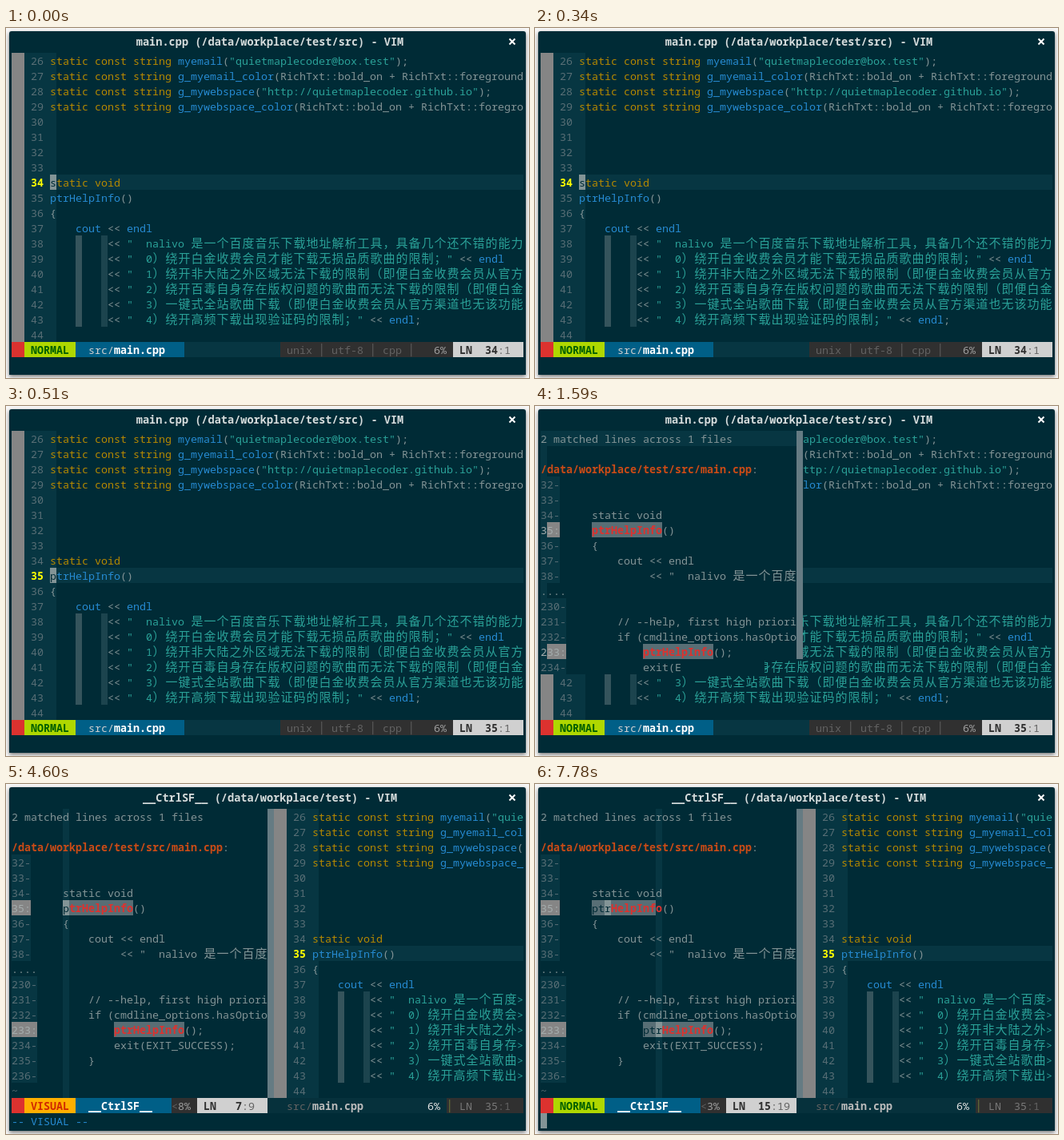
An HTML page with a canvas for the animation above (8 s loop, 654 by 437 pixels).

```html
<!DOCTYPE html>
<html lang="zh">
<head>
<meta charset="utf-8">
<title>Vim search and multiple cursors</title>
<style>
  html, body { margin: 0; width: 100%; height: 100%; overflow: hidden; background: #f8f8f8; }
  canvas { display: block; width: 654px; height: 437px; }
</style>
</head>
<body>
<canvas id="stage" width="654" height="437"></canvas>
<script>
const ctx = document.getElementById('stage').getContext('2d');
const CELL = 8, ROW = 19, LEFT = 7, TOP = 31, RIGHT = 647, SPLIT = 327;
const STATUS = 19, COMMAND = 20, LOOP = 8000;
const MONO = '"Noto Sans Mono", "DejaVu Sans Mono", monospace';
const CJK = '15px "Noto Sans CJK SC", "Noto Sans CJK", sans-serif';
const C = {
  page: '#f8f8f8', bg: '#002b36', band: '#073642', dim: '#586e75', text: '#839496',
  yellow: '#b58900', blue: '#268bd2', cyan: '#2aa198', red: '#dc322f', orange: '#cb4b16',
  sign: '#858585', split: '#657b83', guide1: '#35545c', guide2: '#1c444e',
  info: '#303030', faint: '#626262', light: '#d0d0d0', white: '#ffffff'
};

const source = [
  'static const string myemail("quietmaplecoder@box.test");',
  'static const string g_myemail_color(RichTxt::bold_on + RichTxt::foreground',
  'static const string g_mywebspace("http://quietmaplecoder.github.io");',
  'static const string g_mywebspace_color(RichTxt::bold_on + RichTxt::foregro',
  '', '', '', '',
  'static void',
  'ptrHelpInfo()',
  '{',
  '    cout << endl',
  '         << "  nalivo 是一个百度音乐下载地址解析工具，具备几个还不错的能力',
  '         << "  0）绕开白金收费会员才能下载无损品质歌曲的限制；" << endl',
  '         << "  1）绕开非大陆之外区域无法下载的限制（即便白金收费会员从官方',
  '         << "  2）绕开百毒自身存在版权问题的歌曲而无法下载的限制（即便白金',
  '         << "  3）一键式全站歌曲下载（即便白金收费会员从官方渠道也无该功能',
  '         << "  4）绕开高频下载出现验证码的限制；" << endl;',
  ''
];
const results = [
  '2 matched lines across 1 files',
  '',
  '/data/workplace/test/src/main.cpp:',
  '32-',
  '33-',
  '34-     static void',
  '35:     ptrHelpInfo()',
  '36-     {',
  '37-         cout << endl',
  '38-              << "  nalivo 是一个百度',
  '....',
  '230-',
  '231-        // --help, first high priori',
  '232-        if (cmdline_options.hasOptio',
  '233:            ptrHelpInfo();',
  '234-            exit(EXIT_SUCCESS);',
  '235-        }',
  '236-',
  '~'
];
const MATCH = 'ptrHelpInfo';
const TOKENS = /("[^"]*"?|\b(?:static|const|string|void)\b|\b(?:cout|endl|ptrHelpInfo|myemail|g_\w+)\b)/;

const rowY = row => TOP + row * ROW;
const isWide = ch => ch >= '\u2e80';

function fill(color, x, y, w, h) {
  ctx.fillStyle = color;
  ctx.fillRect(x, y, w, h);
}
const block = (color, x, row, w, rows = 1) => fill(color, x, rowY(row), w, rows * ROW);

// Writes on the terminal grid and returns the x after the last cell.
function put(x, row, str, color, bold = false, max = RIGHT) {
  const font = `${bold ? 'bold ' : ''}13.333px ${MONO}`;
  const y = rowY(row) + 15;
  ctx.fillStyle = color;
  for (let ch of str) {
    if (x >= max) break;
    const wide = isWide(ch);
    if (wide && x + 2 * CELL > max) {
      ch = '>';
      ctx.font = font;
      ctx.fillText(ch, x, y);
      return max;
    }
    ctx.font = wide ? CJK : font;
    if (ch !== ' ') ctx.fillText(ch, wide ? x + 0.5 : x, y);
    x += wide ? 2 * CELL : CELL;
  }
  return x;
}

function tokenColor(token) {
  if (token[0] === '"') return C.cyan;
  if (/^(static|const|string|void)$/.test(token)) return C.yellow;
  return TOKENS.test(token) ? C.blue : C.text;
}

function cursor(x, row, ch = ' ') {
  block(C.text, x, row, CELL);
  put(x, row, ch, C.bg);
}

function drawWindow(title) {
  ctx.save();
  ctx.shadowColor = 'rgba(0,0,0,.55)';
  ctx.shadowBlur = 5;
  ctx.shadowOffsetY = 2;
  ctx.fillStyle = C.bg;
  ctx.beginPath();
  ctx.roundRect(4, 4, 646, 429, [3, 3, 0, 0]);
  ctx.fill();
  ctx.restore();

  ctx.font = `bold 13.6px ${MONO}`;
  ctx.fillStyle = '#d6dcdc';
  ctx.textAlign = 'center';
  ctx.fillText(`${title} - VIM`, 330, 22);
  ctx.textAlign = 'left';

  ctx.strokeStyle = C.white;
  ctx.lineWidth = 2;
  ctx.beginPath();
  ctx.moveTo(629.5, 13.5); ctx.lineTo(636.5, 20.5);
  ctx.moveTo(636.5, 13.5); ctx.lineTo(629.5, 20.5);
  ctx.stroke();
}

function drawSource(x, line) {
  const code = x + 48, current = line - 26;
  block(C.sign, x, 0, 16, 19);
  block(C.band, x + 16, 0, 40 , 19);
  block(C.band, code, current, RIGHT - code);
  block(C.guide1, code + 32, 12, CELL, 6);
  block(C.guide2, code + 64, 12, CELL, 6);
  source.forEach((str, row) => {
    const here = row === current;
    put(x + 24, row, String(26 + row), here ? '#ffff00' : C.dim, here);
    let at = code;
    for (const token of str.split(TOKENS)) at = put(at, row, token, tokenColor(token));
  });
}

function drawResults({ row, col, mode, selected = [], hideCursor }) {
  const column = LEFT + (col - 1) * CELL;
  const matchAt = str => str.indexOf(MATCH);
  const numberOf = str => (str.match(/^\d+[-:]/) || [''])[0];

  if (mode === 'NORMAL' && !selected.length) block(C.band, LEFT, row - 1, SPLIT - LEFT);
  results.forEach((str, i) => {
    const number = numberOf(str), m = matchAt(str);
    block(m < 0 ? C.band : C.sign, LEFT, i, number.length * CELL);
    if (m >= 0) block(C.dim, LEFT + m * CELL, i, MATCH.length * CELL);
  });
  block(C.band, column, 0, CELL, 19);

  results.forEach((str, i) => {
    const number = numberOf(str), m = matchAt(str);
    let x = put(LEFT, i, number, m < 0 ? C.dim : '#a4acac');
    let rest = str.slice(number.length);
    if (i === 2) {
      x = put(x, i, rest.slice(0, -1), C.orange, true);
      rest = ':';
    }
    if (m < 0) {
      put(x, i, rest, str === '~' ? C.dim : C.text, false, SPLIT);
    } else {
      x = put(LEFT + m * CELL, i, MATCH, C.red, true);
      put(x, i, str.slice(m + MATCH.length), C.text);
    }
  });

  for (const [line, length] of selected) {
    const x = LEFT + matchAt(results[line - 1]) * CELL;
    block(C.dim, x, line - 1, length * CELL);
    put(x, line - 1, MATCH.slice(0, length), C.bg);
    cursor(x + (length - 1) * CELL, line - 1, MATCH[length - 1]);
  }
  if (!selected.length && !hideCursor) cursor(column, row - 1, results[row - 1][col - 1]);
}

function drawMode(mode) {
  const visual = mode === 'VISUAL';
  block(C.red, LEFT, STATUS, 16);
  block(visual ? '#ffaf00' : '#afd700', 23, STATUS, 64);
  put(31, STATUS, mode, visual ? '#d02800' : '#005f00', true);
}

function drawPosition(x, row, col, bg, strong, soft, bold) {
  block(bg, x, STATUS, 88);
  put(x + 8, STATUS, 'LN', strong, bold);
  put(x + 56 - String(row).length * CELL, STATUS, String(row), strong, bold);
  put(x + 56, STATUS, ':' + col, soft);
}

function drawEditor({ line, command }) {
  drawWindow('main.cpp (/data/workplace/test/src)');
  drawSource(LEFT, line);
  block(C.band, 223, STATUS, 120);
  drawMode('NORMAL');
  block('#005f87', 87, STATUS, 136);
  put(put(103, STATUS, 'src/', C.light), STATUS, 'main.cpp', C.white, true);
  block(C.info, 343, STATUS, 216);
  put(351, STATUS, 'unix │ utf-8 │ cpp │', C.faint);
  put(535, STATUS, '6%', '#9e9e9e');
  drawPosition(559, line, 1, C.light, C.info, C.faint, true);
  if (command) cursor(LEFT, COMMAND);
  else cursor(55, line - 26, source[line - 26][0]);
}

// The result pane is painted over the editor down to the middle of one row.
function drawOpening() {
  drawEditor({ line: 35, command: true });
  block(C.bg, LEFT, COMMAND, CELL);
  block(C.bg, LEFT, 0, 328, 15);
  block(C.bg, LEFT, 15, 280);
  ctx.save();
  ctx.beginPath();
  ctx.rect(LEFT, TOP, 328, 15 * ROW);
  ctx.rect(LEFT, rowY(15), 176, ROW);
  ctx.clip();
  drawResults({ row: 1, col: 1, mode: 'NORMAL', hideCursor: true });
  block(C.split, SPLIT, 0, CELL, 15);
  ctx.restore();
}

function drawSplit(state) {
  const { row, col, mode, command } = state;
  drawWindow('__CtrlSF__ (/data/workplace/test)');
  drawResults({ ...state, hideCursor: command });
  block(C.split, SPLIT, 0, CELL, 19);
  drawSource(335, 35);

  drawMode(mode);
  block('#005f87', 87, STATUS, 120);
  put(103, STATUS, '__CtrlSF__', C.white, true);
  block(C.info, 207, STATUS, 32);
  const percent = Math.floor(row / 18 * 100) % 10;
  put(put(207, STATUS, '<', C.faint), STATUS, percent + '%', '#9e9e9e');
  drawPosition(239, row, col, C.light, C.info, C.faint, true);

  block('#06313c', SPLIT, STATUS, 224);
  put(put(351, STATUS, 'src/', C.faint), STATUS, 'main.cpp', '#bcbcbc', true);
  put(527, STATUS, '6%', '#e4e4e4');
  drawPosition(559, 35, 1, C.info, '#787878', C.faint, false);
  block(C.info, 551, STATUS, CELL);
  put(551, STATUS, '│', '#6f7a3a');

  if (mode === 'VISUAL') put(LEFT, COMMAND, '-- VISUAL --', C.blue);
  if (command) cursor(LEFT, COMMAND);
}

const editor = (line, command) => () => drawEditor({ line, command });
const split = (row, col = 1, mode = 'NORMAL', extra = {}) =>
  () => drawSplit({ row, col, mode, ...extra });
const blank = () => {};

const steps = [
  [0, editor(34)],
  [300, blank],
  [340, editor(34)],
  [470, blank],
  [510, editor(35)],
  [1310, editor(35, true)],
  [1590, drawOpening],
  [1630, split(1)],
  [2140, split(2)],
  [2420, split(3)],
  [2580, split(4)],
  [2750, split(5)],
  [2910, split(6)],
  [3170, split(7)],
  [3480, split(7, 3)],
  [3670, split(7, 9)],
  [4560, split(7, 9, 'VISUAL')],
  [5890, split(7, 10, 'VISUAL', { selected: [[7, 2]] })],
  [5940, split(7, 11, 'VISUAL', { selected: [[7, 3]] })],
  [7780, split(15, 19, 'NORMAL', { selected: [[7, 3], [15, 3]], command: true })]
];

let shown;
function tick() {
  const time = performance.now() % LOOP;
  const step = steps.findLast(([start]) => start <= time);
  if (step !== shown) {
    shown = step;
    fill(C.page, 0, 0, 654, 437);
    step[1]();
  }
  requestAnimationFrame(tick);
}
tick();
</script>
</body>
</html>
```
